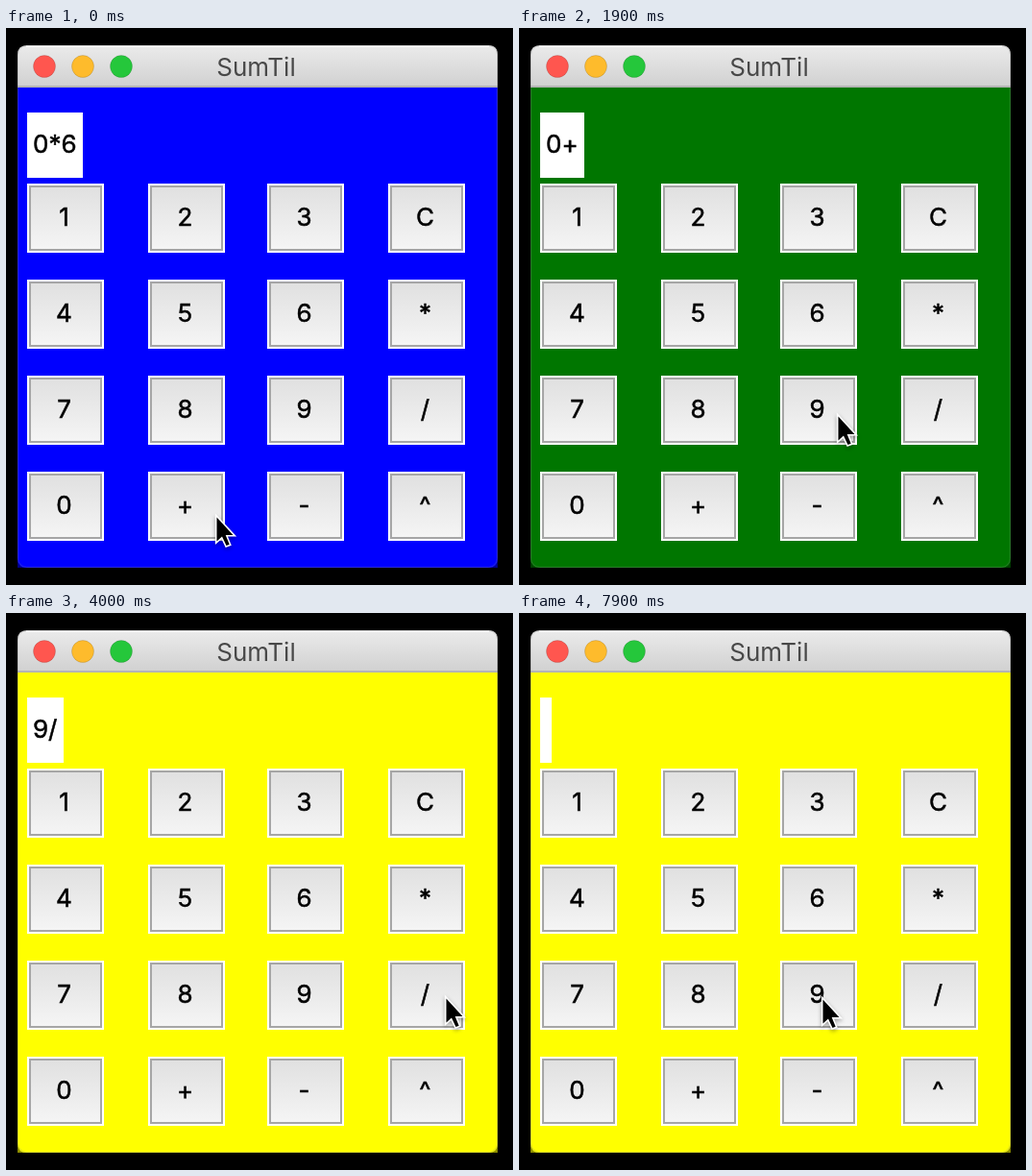
An HTML page that plays this animation: 528x580 px, repeating every 8 s.

```html
<!DOCTYPE html>
<html lang="en">
<head>
<meta charset="utf-8">
<title>Calculator</title>
<style>
  html, body { margin: 0; width: 100%; height: 100%; overflow: hidden; background: #000; }
  svg { display: block; width: 528px; height: 580px; }
  text { font: 26px Inter, "Open Sans", sans-serif; font-feature-settings: "calt" 0; }
  #sum, #keys text { stroke: #000; stroke-width: .5px; }
  #keys text { text-anchor: middle; }
  #arrow { filter: drop-shadow(0 2px 2px rgba(0, 0, 0, .35)); }
</style>
</head>
<body>
<svg viewBox="0 0 528 580">
  <defs>
    <linearGradient id="bar" x2="0" y2="1">
      <stop stop-color="#ebebeb"/><stop offset="1" stop-color="#d0d0d0"/>
    </linearGradient>
    <linearGradient id="face" x2="0" y2="1">
      <stop stop-color="#e0e0e0"/><stop offset="1" stop-color="#f5f5f5"/>
    </linearGradient>
  </defs>
  <rect width="528" height="580"/>
  <g id="body">
    <path d="M12 62H512V562H12Z"/>
    <path d="M12 540H512V562H12Z" fill="#000" opacity=".45"/>
    <path d="M12 62H512V552Q512 562 502 562H22Q12 562 12 552Z"/>
  </g>
  <path d="M12 62V28Q12 18 22 18H502Q512 18 512 28V62Z" fill="url(#bar)"/>
  <path d="M21 19H503" stroke="#f7f7f7" stroke-width="2"/>
  <path d="M12 61H512" stroke="#b4b4b4" stroke-width="2"/>
  <rect x="12.5" y="18.5" width="499" height="543" rx="9" fill="none" stroke="#888" opacity=".3"/>
  <g id="lights"></g>
  <text x="260.5" y="50" text-anchor="middle" fill="#484848">SumTil</text>
  <rect id="field" x="22" y="88" height="68" fill="#fff"/>
  <text id="sum" x="28" y="130"></text>
  <g id="keys"></g>
  <path id="arrow" d="M2.5 4.5V29.5L8 24.5L12.5 34L15.7 32.8L11.7 23H19.5Z"
        stroke="#fff" stroke-width="3.2" paint-order="stroke"/>
</svg>
<script>
const LOOP = 8000, STEP = 100;
const $ = id => document.getElementById(id);

function add(parent, tag, attrs, text = "") {
  const el = document.createElementNS("http://www.w3.org/2000/svg", tag);
  for (const k in attrs) el.setAttribute(k, attrs[k]);
  el.textContent = text;
  parent.append(el);
}

["#ff564f", "#febb2c", "#25c73b"].forEach((fill, i) =>
  add($("lights"), "circle", { cx: 40 + 40 * i, cy: 40, r: 11.5, fill, stroke: "#000", "stroke-opacity": .13 }));

[..."123C456*789/0+-^"].forEach((label, i) => {
  const x = 22 + 2 * Math.round(62.6 * (i % 4)), y = 162 + 100 * Math.floor(i / 4);
  add($("keys"), "rect", { x, y, width: 80, height: 72, fill: "#fff" });
  add($("keys"), "rect", { x: x + 3, y: y + 3, width: 74, height: 66,
    fill: "url(#face)", stroke: "#a6a6a6", "stroke-width": 2 });
  add($("keys"), "text", { x: x + 38.5, y: y + 44 }, label);
});

const states = [
  { at: 0, color: "#0000ff", sum: "0*6" },
  { at: 200, color: "#007600", sum: "0+" },
  { at: 3100, color: "#007600", sum: "0+9" },
  { at: 3800, color: "#ffff00", sum: "9/" },
  { at: 4900, color: "#ffff00", sum: "" }
];

// The pointer rests between moves.
const home = [217, 505];
const moves = [
  { from: 800, to: 1200, end: [462, 386] },
  { from: 1200, to: 1600, end: [330, 400] },
  { from: 2500, to: 2900, end: [305, 384] },
  { from: 3400, to: 3800, end: [456, 397] },
  { from: 4600, to: 5300, end: [453, 400] },
  { from: 6000, to: 6400, end: [368, 348] },
  { from: 6400, to: 6800, end: [436, 508] },
  { from: 7500, to: 7900, end: [314, 398] }
];

const ease = u => u * u * (3 - 2 * u);
const clamp = u => Math.min(1, Math.max(0, u));

function pointer(t) {
  return moves.reduce((pos, { from, to, end }) => {
    const k = ease(clamp((t - from) / (to - from)));
    return pos.map((v, i) => v + (end[i] - v) * k);
  }, home);
}

function draw(now) {
  const t = Math.floor(now % LOOP / STEP) * STEP;
  const { color, sum } = states.filter(s => s.at <= t).pop();
  $("body").setAttribute("fill", color);
  $("sum").textContent = sum;
  const width = sum && $("sum").getComputedTextLength();
  $("field").setAttribute("width", 12 + 2 * Math.round(width / 2));
  $("arrow").setAttribute("transform", `translate(${pointer(t)})`);
}

const start = performance.now();
function tick() {
  draw(performance.now() - start);
  requestAnimationFrame(tick);
}
tick();
</script>
</body>
</html>
```
